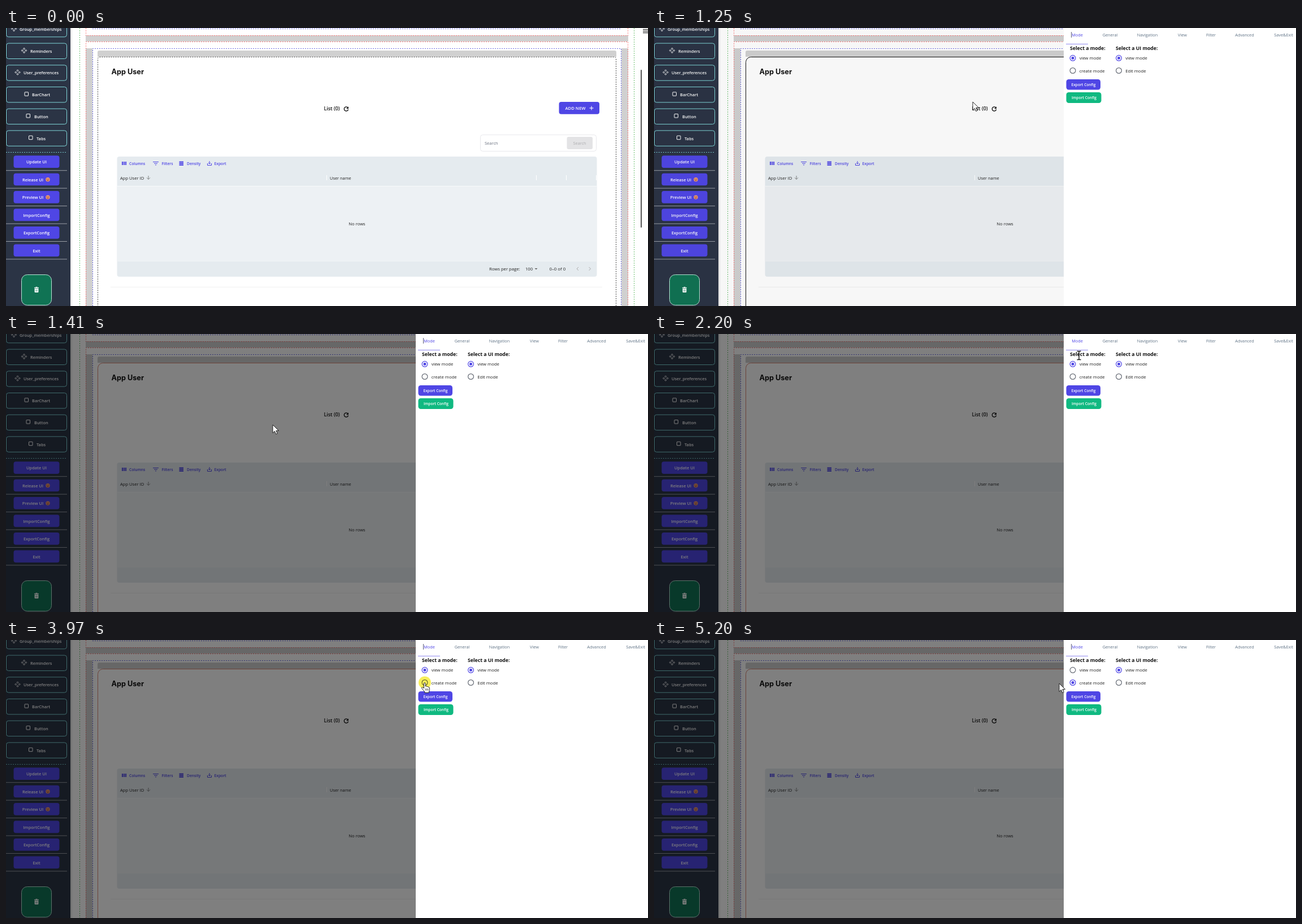
An HTML page with a canvas that plays this animation: 1136x493 px, repeating every 5.27 s.

```html
<!DOCTYPE html>
<html lang="en">
<head>
<meta charset="utf-8">
<title>App builder settings</title>
<style>
html, body { margin: 0; width: 100%; height: 100%; overflow: hidden; background: #fff; }
canvas { display: block; }
</style>
</head>
<body>
<canvas id="stage" width="1136" height="493"></canvas>
<script>
const ctx = document.getElementById('stage').getContext('2d');
const LOOP = 5270, INDIGO = '#4f46e5', INK = '#222', GREY = '#6b7280', TEAL = '#7fd6d8';

// Bursts of screen updates: start, end, number of steps.
const bursts = [[320, 610, 5], [920, 1410, 7], [1480, 1990, 9], [2060, 2410, 6], [2610, 2690, 2],
  [2890, 3360, 8], [3430, 3570, 3], [3970, 3970, 1], [4170, 4310, 3], [4580, 5060, 7], [5130, 5200, 2]];

// Pointer path: time, x, y.
const path = [[320, 606, 400], [610, 564, 131], [1250, 564, 131], [1330, 558, 131], [1410, 472, 161],
  [1600, 428, 184], [1760, 480, 165], [1990, 709, 62], [2060, 724, 50], [2200, 752, 38], [2410, 765, 39],
  [2550, 765, 39], [2690, 795, 39], [2820, 795, 39], [3360, 753, 79], [3570, 741, 76], [4510, 741, 76],
  [5060, 729, 82], [5200, 717, 77]];

function snap(t) {
  const burst = bursts.filter(b => b[0] <= t).pop();
  if (!burst) return 0;
  const [start, end, n] = burst;
  for (let i = n - 1; i > 0; i--) {
    const step = Math.round((start + (end - start) * i / (n - 1)) / 10) * 10;
    if (t >= step) return step;
  }
  return start;
}

function pointerAt(t) {
  const i = path.findIndex(p => p[0] >= t);
  if (i < 0) return path[path.length - 1].slice(1);
  if (i === 0) return path[0].slice(1);
  const [a, b] = [path[i - 1], path[i]], k = (t - a[0]) / (b[0] - a[0]);
  return [a[1] + (b[1] - a[1]) * k, a[2] + (b[2] - a[2]) * k];
}

function text(str, x, y, size, color = INK, weight = 400, align = 'left', family = 'Open Sans') {
  ctx.font = `${weight} ${size}px "${family}", sans-serif`;
  ctx.fillStyle = color;
  ctx.textAlign = align;
  ctx.fillText(str, x, y + size * 0.36);
}

function rect(x, y, w, h, color) {
  ctx.fillStyle = color;
  ctx.fillRect(x, y, w, h);
}

function box(x, y, w, h, r, fill, stroke) {
  ctx.beginPath();
  ctx.roundRect(x, y, w, h, r);
  if (fill) { ctx.fillStyle = fill; ctx.fill(); }
  if (stroke) { ctx.strokeStyle = stroke; ctx.lineWidth = 1; ctx.stroke(); }
}

function line(points, color, width = 1, dash = []) {
  ctx.beginPath();
  for (let i = 0; i < points.length; i += 2) ctx.lineTo(points[i], points[i + 1]);
  ctx.strokeStyle = color;
  ctx.lineWidth = width;
  ctx.setLineDash(dash);
  ctx.stroke();
  ctx.setLineDash([]);
}

const dotted = (points, color) => line(points, color, 0.9, [2, 2]);

function circle(x, y, r, fill, stroke, width = 1.2) {
  ctx.beginPath();
  ctx.arc(x, y, r, 0, 7);
  if (fill) { ctx.fillStyle = fill; ctx.fill(); }
  if (stroke) { ctx.strokeStyle = stroke; ctx.lineWidth = width; ctx.stroke(); }
}

function shape(d, x, y, fill, stroke, width = 1) {
  ctx.save();
  ctx.translate(x, y);
  const p = new Path2D(d);
  if (fill) { ctx.fillStyle = fill; ctx.fill(p); }
  if (stroke) { ctx.strokeStyle = stroke; ctx.lineWidth = width; ctx.stroke(p); }
  ctx.restore();
}

const DIAMONDS = [[0, -3.2], [3.2, 0], [0, 3.2], [-3.2, 0]]
  .map(([x, y]) => `M${x} ${y - 1.5}l1.5 1.5-1.5 1.5-1.5-1.5z`).join('');

function sidebar() {
  rect(0, 0, 114, 493, '#2b3445');
  rect(114, 0, 3, 493, '#ececec');
  [['Group_memberships', 14, 24], ['Reminders', 32, 43], ['User_preferences', 20.5, 31],
    ['BarChart', 36, 46], ['Button', 39, 50], ['Tabs', 43.5, 54]].forEach(([label, iconX, x], i) => {
    const y = 2.2 + i * 38.7;
    box(0.5, y - 13.8, 107, 27.4, 4, null, TEAL);
    text(label, x, y + 0.2, 7.4, '#fff', 600);
    if (i < 3) shape(DIAMONDS, iconX, y - 1, null, '#fff', 1);
    else box(iconX - 3, y - 4.5, 6.5, 6.5, 0.5, null, '#fff');
  });
  dotted([0, 220.5, 108, 220.5], TEAL);
  ['Update UI', 'Release UI', 'Preview UI', 'ImportConfig', 'ExportConfig', 'Exit'].forEach((label, i) => {
    const y = 237.2 + i * 31.45, face = i === 1 || i === 2;
    box(13.5, y - 11, 81, 21.7, 4, INDIGO);
    text(label, face ? 47.5 : 54, y + 0.5, 7.4, '#fff', 600, 'center');
    if (face) {
      circle(74, y, 3.7, '#ef9a72');
      rect(72, y - 1.3, 1.2, 1.2, '#7c3a2a');
      rect(74.8, y - 1.3, 1.2, 1.2, '#7c3a2a');
      rect(72.5, y + 1.2, 3, 1, '#7c3a2a');
    }
    rect(0, y + 15, 108, 1, '#9a9ea6');
  });
  box(27.5, 437.5, 53, 54, 10, '#107354', '#b9e6d6');
  shape('M-4-4h2l1-1h2l1 1h2v1.3h-8zM-3.4-2h6.8v6q0 1-1 1h-4.8q-1 0-1-1z', 54, 464, '#fff');
  line([53, 463.5, 53, 467.5], '#107354', 0.7);
  line([55, 463.5, 55, 467.5], '#107354', 0.7);
}

function frames(outline) {
  const red = '#ff6a6a', blue = '#5c5ce0', band = '#d0d0d0';
  rect(141, 13, 960, 11, band);
  rect(141, 36, 12, 457, band);
  rect(1089, 36, 12, 457, band);
  box(162, 40, 918, 11, [3, 3, 0, 0], band);
  dotted([130.5, 0, 130.5, 493], '#5cb860');
  dotted([1111.5, 0, 1111.5, 493], '#5cb860');
  dotted([141.5, 0, 141.5, 13.5, 1100.5, 13.5, 1100.5, 0], red);
  dotted([141.5, 493, 141.5, 24.5, 1100.5, 24.5, 1100.5, 493], red);
  dotted([153, 1.5, 1089, 1.5], blue);
  dotted([153.5, 493, 153.5, 36.5, 1088.5, 36.5, 1088.5, 493], blue);
  if (!outline) ctx.setLineDash([2, 2]);
  box(162.5, 51.5, 917, 460, outline ? 9 : 3, '#fff', outline || '#444');
  ctx.setLineDash([]);
  for (const y of [2.5, 5.5, 8.5]) line([1127, y, 1136, y], '#222', 1.2);
  box(1123, 74, 2, 280, 1, '#555');
}

function table() {
  box(196.5, 228, 849, 213, 4, '#e5ebef');
  rect(196.5, 280, 849, 134, '#edf1f4');
  rect(196.5, 280, 849, 1, '#f8fafb');
  rect(196.5, 413, 849, 1, '#f0f3f5');
  for (const x of [205, 208, 211]) rect(x, 237, 2, 6, INDIGO);
  [[260, 10], [262, 6], [264, 2]].forEach(([x, w], i) => rect(x, 237 + i * 2.7, w, 1, INDIGO));
  for (const y of [236.5, 239.2, 241.9]) rect(306.5, y, 7.5, 2, INDIGO);
  shape('M-3.5 0v3.5h7V0M0-4v5M-2-1l2 2 2-2', 360, 240, null, INDIGO);
  [['Columns', 218], ['Filters', 275.5], ['Density', 320], ['Export', 368.5]]
    .forEach(([label, x]) => text(label, x, 240.3, 6.7, INDIGO, 600));
  text('App User ID', 202, 266, 7.6);
  shape('M0-3.2v6.2M-3 .2l3 3 3-3', 252, 265.2, null, '#666', 0.8);
  text('User name', 573, 266, 7.4);
  for (const x of [567, 938, 991, 1044]) rect(x, 261, 1, 9, '#fff');
  text('No rows', 621, 347.5, 7.7, INK, 400, 'center');
  text('Rows per page:', 855, 427.5, 7.7);
  text('100', 919, 427.5, 7.6);
  shape('M-2.5-1h5l-2.5 2.6z', 938, 427, '#666');
  text('0–0 of 0', 961.5, 427.5, 7.8);
  shape('M1.5-3l-3 3 3 3', 1011.5, 427, null, '#aaa');
  shape('M-1.5-3l3 3-3 3', 1033, 427, null, '#aaa');
}

function page(outline) {
  rect(0, 0, 1136, 493, '#fff');
  frames(outline);
  sidebar();
  text('App User', 186.5, 77, 12.7, '#111', 700, 'left', 'Inter');
  text('List (0)', 562.5, 143, 8.9, '#111', 600);
  shape('M2.6-2.6A3.7 3.7 0 1 0 3.6 1', 602, 143.5, null, '#111', 1.3);
  shape('M4-4.3v4h-4z', 602, 143.5, '#111');
  box(978.5, 131, 71.5, 21.7, 4, INDIGO);
  text('ADD NEW', 989.5, 142, 7.7, '#fff', 600);
  line([1032.5, 142, 1039.5, 142], '#fff', 1.1);
  line([1036, 138.5, 1036, 145.5], '#fff', 1.1);
  box(839.5, 189.5, 205, 29, 4, '#fff', '#e8e8ec');
  text('Search', 847, 204, 7.5, GREY);
  box(992.5, 193, 45.5, 22, 3, '#e3e3e5');
  text('Search', 1015, 204, 7.3, '#adadb0', 400, 'center');
  table();
  rect(185, 459, 870, 1, '#f1f1f1');
}

function radio(label, x, y, on) {
  circle(x, y, 4.9, null, on ? INDIGO : '#666b75');
  if (on) circle(x, y, 2.5, INDIGO);
  text(label, x + 11.7, y + 0.3, 7.65);
}

function drawer(created, caret) {
  rect(725, 0, 411, 493, '#fff');
  [['Mode', 749], ['General', 807], ['Navigation', 873], ['View', 935], ['Filter', 985.5],
    ['Advanced', 1045], ['Save&Exit', 1114]].forEach(([label, x], i) =>
    text(label, x, 12.5, 7.3, i ? '#5f7285' : INDIGO, 400, 'center'));
  rect(729, 28, 39, 1, '#8f89ef');
  if (caret) rect(738, 7, 1, 10, '#5a5a78');
  text('Select a mode:', 736, 36.3, 8.7, '#111', 700);
  text('Select a UI mode:', 817, 36.3, 8.7, '#111', 700);
  radio('view mode', 741, 53.3, !created);
  radio('create mode', 741, 75.5, created);
  radio('view mode', 822.5, 53.3, true);
  radio('Edit mode', 822.5, 75.5, false);
  box(729.5, 91, 60.5, 18.5, 4.5, INDIGO);
  text('Export Config', 760, 100.8, 6.6, '#fff', 600, 'center');
  box(729.5, 114, 62, 19, 4.5, '#10b981');
  text('Import Config', 761, 123.8, 6.6, '#fff', 600, 'center');
}

function pointer(t) {
  const [x, y] = pointerAt(t);
  if ((t >= 920 && t < 1160) || (t >= 3970 && t < 4170)) {
    ctx.globalCompositeOperation = 'multiply';
    circle(x, y - 0.5, 11, '#f8ef5a');
    ctx.globalCompositeOperation = 'source-over';
  }
  if (t < 2130 || t >= 5130) {
    shape('M0 0v14.5l3.4-3.2 2.3 5.3 2.5-1.1-2.3-5.1h4.6z', x, y, '#fff', '#111', 0.9);
  } else if (t < 3200) {
    shape('M-3.5-7.5h2.5q1 0 1 1 0-1 1-1h2.5M0-6.5v13M-3.5 7.5h2.5q1 0 1-1 0 1 1 1h2.5', x, y, null, '#111', 1.4);
  } else {
    shape('M-1.5 1q0-1.3 1.3-1.3T1.2 1v5q2.2-.8 2.6.7 2-.6 2.4.8 2.2-.3 2.2 1.5v3.5q0 1.5-1 3v2h-7.5v-1.6' +
      'l-5-6q-1-2 .7-2.2 1.6 0 2.9 2z', x, y, '#fff', '#111', 0.9);
    for (const dx of [1.6, 3.7, 5.8]) line([x + dx, y + 10, x + dx, y + 13.5], '#111', 0.7);
  }
}

function draw(t) {
  const open = t >= 1250;
  const outline = t < 320 ? null : t < 1330 ? '#111' : '#d98672';
  page(outline);
  if (open) {
    const shade = t < 1330 ? 0.03 : t < 1410 ? 0.4 : 0.5;
    rect(0, 0, 1136, 493, `rgba(0,0,0,${shade})`);
    const caret = t < 3450 ? Math.floor((t - 1330) / 530) % 2 === 0 || t < 1860 : t < 4640 || t >= 5170;
    drawer(t >= 4240, caret);
  }
  if (t >= 320) pointer(t);
}

ctx.textBaseline = 'alphabetic';
function tick() {
  draw(snap(performance.now() % LOOP));
  requestAnimationFrame(tick);
}
tick();
</script>
</body>
</html>
```
